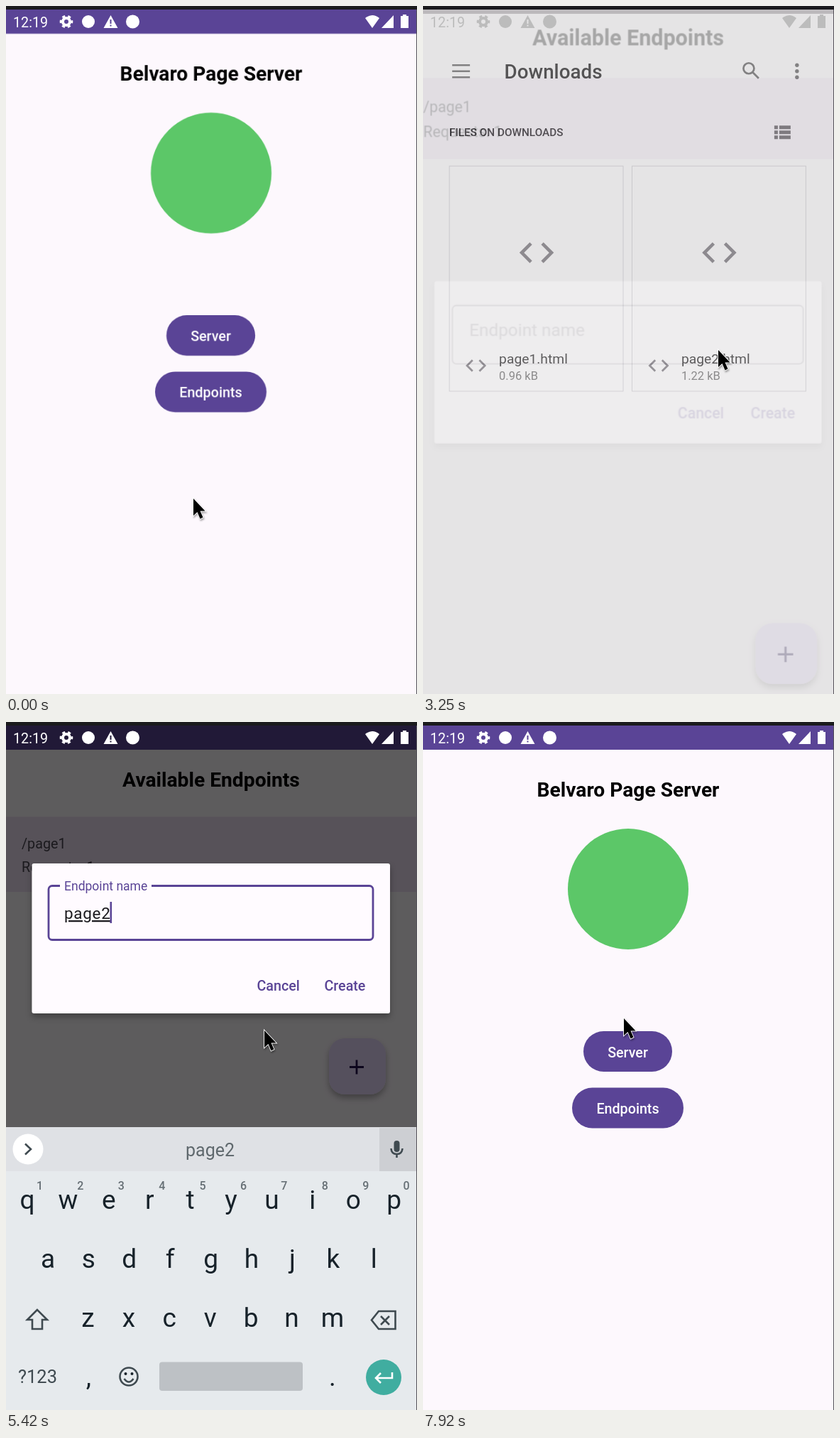
Animation of 579 by 968 pixels, one loop 8 s. Source, as an HTML page:

```html
<!DOCTYPE html>
<html lang="en">
<head>
<meta charset="utf-8">
<title>Endpoint demo</title>
<style>
html, body { margin: 0; width: 100%; height: 100%; overflow: hidden; background: #000; }
svg { display: block; width: 100vw; height: 100vh; font-family: Roboto, sans-serif; font-size: 19.7px; }
.title { font-size: 28.2px; font-weight: 700; text-anchor: middle; }
.medium { font-weight: 500; }
.mid { text-anchor: middle; }
.bg { fill: #fdf8fd; }
.purple { fill: #5a4496; }
.row { fill: #ebddf1; }
.rowText { fill: #49454f; }
.line { fill: none; stroke: currentColor; }

/* 1% of the loop = 80 ms */
.anim { animation: 8s linear infinite both; }
.page { transform-origin: 289px 531px; }
#home { animation-name: homeScale, homeFade; }
#list { animation-name: listScale, listFade; }
#files { animation-name: filesScale, filesFade; }
#home, #list, #files { animation-duration: 8s; animation-iteration-count: infinite; animation-timing-function: linear; }
#row2 { animation-name: row2; }
#fab { animation-name: fab; }
#dialog, #dim { animation-name: dialogFade; }
#lift { animation-name: lift; }
#idle { animation-name: idle; }
#focus { animation-name: focus; }
#label { animation-name: floatLabel; transform-origin: 82px 469px; }
#typing { animation-name: typing; }
#hint { animation-name: hint; }
#keyboard { animation-name: keyboard; }
#status { animation-name: statusTint; }
#pointer { animation-name: pointer; animation-timing-function: ease-in-out; }

@keyframes homeScale {
  0%, 10.0625% { transform: scale(1); animation-timing-function: cubic-bezier(.2,0,0,1); }
  15.375%, 92.5% { transform: scale(1.1); animation-timing-function: cubic-bezier(.2,0,0,1); }
  97.8%, 100% { transform: scale(1); }
}
@keyframes homeFade {
  0%, 10.69% { opacity: 1; }
  12.5% { opacity: 0; }
  92.49% { opacity: 0; }
  92.5%, 100% { opacity: 1; }
}
@keyframes listScale {
  0%, 10.0625% { transform: scale(.85); animation-timing-function: cubic-bezier(.2,0,0,1); }
  15.375%, 24.375% { transform: scale(1); animation-timing-function: cubic-bezier(.2,0,0,1); }
  29.69%, 40.0625% { transform: scale(1.1); animation-timing-function: cubic-bezier(.2,0,0,1); }
  45.375%, 92.5% { transform: scale(1); animation-timing-function: cubic-bezier(.2,0,0,1); }
  97.8%, 100% { transform: scale(.9); }
}
@keyframes listFade {
  0%, 10.69% { opacity: 0; }
  11.94%, 92.6% { opacity: 1; }
  94.375%, 100% { opacity: 0; }
}
@keyframes filesScale {
  0%, 24.375% { transform: scale(.85); animation-timing-function: cubic-bezier(.2,0,0,1); }
  29.69%, 40.0625% { transform: scale(1); animation-timing-function: cubic-bezier(.2,0,0,1); }
  45.375%, 100% { transform: scale(.93); }
}
@keyframes filesFade {
  0%, 25% { opacity: 0; }
  26.25%, 40.0625% { opacity: 1; }
  41.81%, 100% { opacity: 0; }
}
@keyframes row2 {
  0%, 74.99% { opacity: 0; }
  76.5%, 100% { opacity: 1; }
}
@keyframes fab {
  0%, 59.99% { transform: none; }
  60%, 74.99% { transform: translateY(-398px); }
  75%, 100% { transform: none; }
}
@keyframes dialogFade {
  0%, 39.375% { opacity: 0; }
  42.5%, 72.875% { opacity: 1; }
  74.75%, 100% { opacity: 0; }
}
@keyframes lift {
  0%, 58.75% { transform: none; animation-timing-function: ease-out; }
  60.625%, 100% { transform: translateY(-199px); }
}
@keyframes idle {
  0%, 55.24% { opacity: 1; }
  55.25%, 100% { opacity: 0; }
}
@keyframes focus {
  0%, 55.24% { opacity: 0; }
  55.25%, 100% { opacity: 1; }
}
@keyframes floatLabel {
  0%, 55.24% { transform: none; fill: #79747e; }
  55.25%, 55.94% { transform: none; fill: #5a4496; }
  58%, 100% { transform: translateY(-33px) scale(.78); fill: #5a4496; }
}
@keyframes typing {
  0%, 61.25% { transform: none; animation-timing-function: steps(5); }
  66.875%, 100% { transform: translateX(65px); }
}
@keyframes hint {
  0%, 66.8% { opacity: 0; }
  66.875%, 100% { opacity: 1; }
}
@keyframes keyboard {
  0%, 58.125% { transform: translateY(400px); animation-timing-function: ease-out; }
  60%, 73.125% { transform: none; animation-timing-function: ease-in; }
  75%, 100% { transform: translateY(400px); }
}
@keyframes statusTint {
  0%, 25% { color: #fff; }
  26.25%, 40% { color: #777; }
  41.25%, 100% { color: #fff; }
}
@keyframes pointer {
  0% { transform: translate(264px, 693px); }
  8.5%, 14% { transform: translate(297px, 547px); }
  22%, 26% { transform: translate(490px, 880px); }
  36.5%, 42.5% { transform: translate(416px, 484px); }
  52%, 59% { transform: translate(262px, 475px); }
  66%, 67.75% { transform: translate(364px, 434px); }
  71.5%, 75% { transform: translate(479px, 367px); }
  83%, 92.5% { transform: translate(610px, 300px); animation-timing-function: ease-out; }
  99%, 100% { transform: translate(283px, 417px); }
}
</style>
</head>
<body>
<svg viewBox="0 0 579 968" preserveAspectRatio="none">
  <defs>
    <filter id="shadow" x="-30%" y="-30%" width="160%" height="170%">
      <feDropShadow dx="0" dy="5" stdDeviation="4" flood-opacity=".3"/>
    </filter>
    <g id="base">
      <rect class="bg" y="5" width="579" height="963"/>
      <rect class="purple" y="5" width="579" height="34"/>
    </g>
    <path id="code" d="M-8 -13L-21 0L-8 13M8 -13L21 0L8 13" fill="none" stroke="#77747a" stroke-width="4.6"/>
    <g id="card">
      <rect x="37" y="225" width="245" height="317" fill="none" stroke="#d0cfd3"/>
      <use href="#code" x="160" y="347"/>
      <use href="#code" transform="translate(74.5 506) scale(.6)"/>
    </g>
  </defs>

  <g id="home" class="page">
    <use href="#base"/>
    <text class="title" x="289" y="105">Belvaro Page Server</text>
    <circle cx="289" cy="235" r="85" fill="#5cc768"/>
    <rect class="purple" x="226" y="435" width="125" height="57" rx="28.5"/>
    <rect class="purple" x="210" y="514.5" width="157" height="57" rx="28.5"/>
    <g class="medium mid" fill="#fff">
      <text x="288.5" y="471.5">Server</text>
      <text x="288.5" y="550.5">Endpoints</text>
    </g>
  </g>

  <g id="list" class="page">
    <use href="#base"/>
    <text class="title" x="289" y="91">Available Endpoints</text>
    <g>
      <rect class="row" y="133.5" width="579" height="105.5"/>
      <g class="rowText"><text x="22" y="177.5">/page1</text><text x="22" y="210.5">Requests: 1</text></g>
    </g>
    <g id="row2" class="anim">
      <rect class="row" y="261.5" width="579" height="105.5"/>
      <g class="rowText"><text x="22" y="305.5">/page2</text><text x="22" y="338.5">Requests: 0</text></g>
    </g>
    <g id="fab" class="anim">
      <rect x="455" y="843" width="80" height="79" rx="22" fill="#e7d8fb" filter="url(#shadow)"/>
      <path d="M484 883.5H504M494 873.5V893.5" stroke="#21104d" stroke-width="2.8"/>
    </g>
    <g id="dim" class="anim"><rect y="5" width="579" height="963" opacity=".63"/></g>

    <g id="dialog" class="anim"><g id="lift" class="anim">
      <rect x="36.5" y="398" width="504.5" height="211" rx="3" fill="#fffbff" filter="url(#shadow)"/>
      <rect id="idle" class="anim" x="60" y="429.5" width="457" height="76" rx="5" fill="none" stroke="#79747e" stroke-width="1.4"/>
      <text x="82" y="476" font-size="22.5" letter-spacing=".7" fill="#1c1b1f" text-decoration="underline">page2</text>
      <g id="typing" class="anim">
        <rect x="82" y="450" width="80" height="36" fill="#fffbff"/>
        <g id="focus" class="anim"><rect class="purple" x="81.5" y="452" width="2.6" height="30"/></g>
      </g>
      <g class="anim" style="animation-name:focus">
        <rect x="60" y="429.5" width="457" height="76" rx="5" fill="none" stroke="#5a4496" stroke-width="2.8"/>
        <rect x="76" y="426" width="129" height="7" fill="#fffbff"/>
      </g>
      <text id="label" class="anim" x="82" y="469" font-size="22.5">Endpoint name</text>
      <g class="medium purple">
        <text x="353.5" y="576.5">Cancel</text>
        <text x="448.5" y="576.5">Create</text>
      </g>
    </g></g>
  </g>

  <g id="keyboard" class="anim" fill="#17222a">
    <rect y="570" width="579" height="398" fill="#e6eaed"/>
    <rect y="570" width="579" height="62" fill="#dfe1e5"/>
    <rect x="526" y="571" width="53" height="61" fill="#cdcfd3"/>
    <circle cx="31" cy="601" r="21.5" fill="#fff"/>
    <g fill="none" stroke="#3f4a50" stroke-width="2.6">
      <path d="M27 593.5L35 601L27 608.5"/>
      <path d="M542.5 600Q543 608 550.5 608T558.5 600M550.5 608V613"/>
      <path d="M44 827L30 841H37V854H51V841H58Z"/>
      <path d="M525 829H548.5V854H525L515 841.5ZM528 836L540 848M540 836L528 848"/>
      <circle cx="173" cy="921" r="12.5"/>
      <path d="M166.5 924Q173 933 179.5 924"/>
    </g>
    <rect x="546.5" y="589" width="8" height="16" rx="4" fill="#3f4a50"/>
    <circle cx="168.5" cy="917" r="2"/><circle cx="177.5" cy="917" r="2"/>
    <text id="hint" class="anim mid" x="287.5" y="611" font-size="25" fill="#5f686d">page2</text>
    <g id="keys" class="mid" font-size="37"></g>
    <text class="mid" x="44.5" y="930" font-size="25.5" fill="#3f4a50">?123</text>
    <rect x="216" y="900.5" width="202" height="40.5" rx="4" fill="#bdc1c5"/>
    <circle cx="532" cy="922" r="25" fill="#40ada0"/>
    <path d="M544 915V923H521M528 916L521 923L528 930" fill="none" stroke="#fff" stroke-width="2.6"/>
  </g>

  <g id="files" class="page"><g transform="translate(289 531) scale(1.0128) translate(-289 -531)">
    <rect x="0" y="11" width="579" height="957" fill="#fafafa"/>
    <g fill="#222" stroke="none">
      <path d="M41 83H66M41 91.5H66M41 100H66" stroke="#666" stroke-width="2.4"/>
      <text class="medium" x="114.5" y="101.5" font-size="27.8">Downloads</text>
      <g class="line" color="#666" stroke-width="2.7">
        <circle cx="459" cy="87.5" r="7.5"/><path d="M464.5 93L473 101.5"/>
      </g>
      <g fill="#666">
        <circle cx="527" cy="83" r="2.7"/><circle cx="527" cy="91.5" r="2.7"/><circle cx="527" cy="100" r="2.7"/>
      </g>
      <text class="medium" x="37" y="183" font-size="15.3">FILES ON DOWNLOADS</text>
      <path d="M495 170.5H500M502 170.5H518M495 177.5H500M502 177.5H518M495 184.5H500M502 184.5H518" stroke="#666" stroke-width="5"/>
      <use href="#card"/><use href="#card" x="257.5"/>
      <g font-size="19.3"><text x="107" y="503">page1.html</text><text x="364" y="503">page2.html</text></g>
      <g font-size="16.5" fill="#666"><text x="107" y="526.5">0.96 kB</text><text x="364" y="526.5">1.22 kB</text></g>
    </g>
  </g></g>

  <g id="status" class="anim" fill="currentColor">
    <text x="10" y="29.5">12:19</text>
    <g class="line">
      <circle cx="85" cy="22" r="5" stroke-width="4"/>
      <circle cx="85" cy="22" r="7.6" stroke-width="3.4" stroke-dasharray="4 3.96" stroke-dashoffset="2"/>
    </g>
    <circle cx="116" cy="22" r="9"/>
    <path fill-rule="evenodd" d="M147.500 13L157.500 31H137.500ZM146.500 19V25H148.500V19ZM146.500 26.500V28.500H148.500V26.500Z"/>
    <circle cx="178.500" cy="22" r="9.500"/>
    <path d="M506 17Q516 9 526 17L516 31ZM529 31H546V13ZM556 14H559V12H564V14H567V31H556Z"/>
  </g>

  <rect width="579" height="5" fill="#1b1b1d"/>
  <rect x="578" y="5" width="1" height="963" fill="#55525a"/>
  <g id="pointer" class="anim">
    <path d="M0 0V24L5.500 19L9.500 28.500L13.500 26.500L9.500 17.500H16.500Z" stroke="#fff" stroke-width="1.800" paint-order="stroke" filter="drop-shadow(1px 2px 1px #0005)"/>
  </g>
</svg>
<script>
const keys = document.getElementById('keys');
const pitch = 57.4;

function addRow(chars, startX, y, attrs = {}) {
  const row = document.createElementNS('http://www.w3.org/2000/svg', 'text');
  row.setAttribute('x', [...chars].map((_, i) => startX + i * pitch).join(' '));
  row.setAttribute('y', y);
  for (const name in attrs) row.setAttribute(name, attrs[name]);
  row.textContent = chars;
  keys.append(row);
}

addRow('qwertyuiop', 30, 685);
addRow('1234567890', 47.5, 658, { 'font-size': 16, fill: '#666f75', 'font-weight': 500 });
addRow('asdfghjkl', 59, 768);
addRow('zxcvbnm', 115.5, 851);
addRow(',', 116.5, 934);
addRow('.', 460, 934);
</script>
</body>
</html>
```
